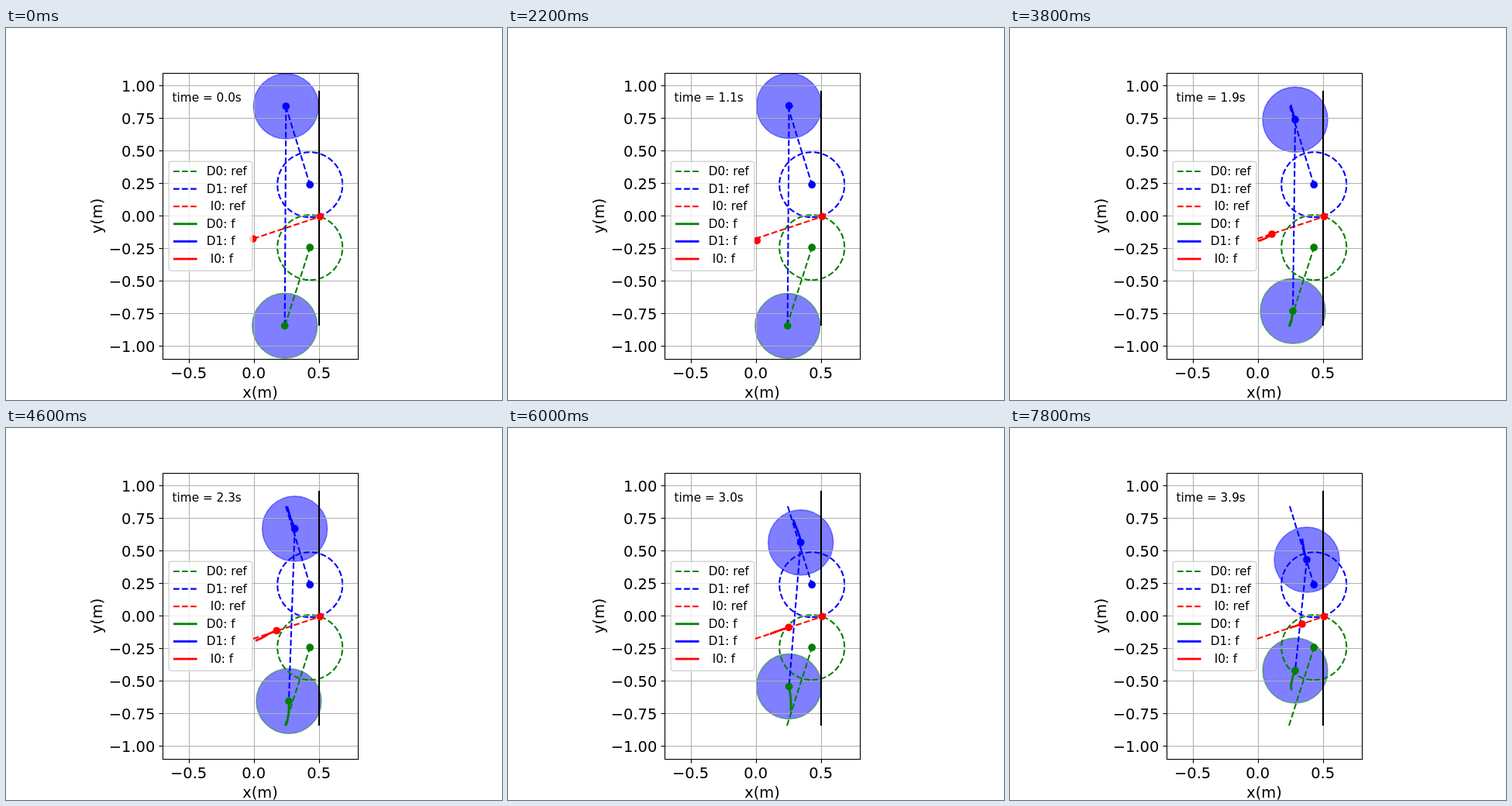
These frames come from a looping animation (640x480 px, 8 s). An HTML page with a canvas:

```html
<!DOCTYPE html>
<html lang="en">
<head>
<meta charset="utf-8">
<title>Disc trajectories</title>
<style>
html, body { margin: 0; width: 100%; height: 100%; overflow: hidden; background: #fff; }
canvas { display: block; }
</style>
</head>
<body>
<canvas id="stage" width="640" height="480"></canvas>
<script>
const ctx = document.getElementById('stage').getContext('2d');
const STEP = 200, LOOP = 8000, TRAIL = 1.1, RADIUS = 42;
const GREEN = '#008000', BLUE = '#0000ff', RED = '#ff0000';
const DASH = [7.7, 3.33];
const AXES = { left: 202.5, right: 454.5, top: 58.5, bottom: 427.5 };

// time (s), then x, y of D1, D0 and I0
const KEYS = [
  [0, 361.3, 101, 359.7, 384.3, 318.7, 272],
  [0.7, 364, 100.3, 360.3, 383.5, 320.3, 273],
  [1.2, 362.5, 101, 361, 384, 322, 274.3],
  [1.5, 364.2, 106, 363, 378.3, 328, 272],
  [1.8, 366.8, 115.2, 364.6, 368, 335.5, 267.8],
  [1.9, 368, 118.2, 365, 365.3, 338, 266],
  [2.4, 373.7, 132.8, 364.8, 349.3, 352, 260.5],
  [2.7, 376.3, 140.3, 363.8, 341, 359.3, 258.3],
  [3.0, 377.7, 147.8, 362.6, 333.5, 362.3, 257.3],
  [3.4, 379.3, 157.2, 364, 325.2, 367, 256],
  [3.6, 380.4, 162.5, 365.2, 320, 370.5, 254.8],
  [3.9, 383, 170, 368, 313, 377, 253]
];
const REFS = [
  { color: BLUE, from: [361, 101], to: [392.2, 202.2], ring: true },
  { color: GREEN, from: [360, 384], to: [392.2, 283.2], ring: true },
  { color: RED, from: [319, 272], to: [405.3, 243.3] }
];

function slope(i, c) {
  const a = KEYS[Math.max(i - 1, 0)], b = KEYS[Math.min(i + 1, KEYS.length - 1)];
  return (b[c] - a[c]) / (b[0] - a[0]);
}

// Hermite curve through the keys
function valueAt(t, c) {
  let i = 0;
  while (i < KEYS.length - 2 && t > KEYS[i + 1][0]) i++;
  const a = KEYS[i], b = KEYS[i + 1], span = b[0] - a[0], u = (t - a[0]) / span;
  const m = slope(i, c) * span, n = slope(i + 1, c) * span, d = b[c] - a[c];
  return a[c] + u * (m + u * (3 * d - 2 * m - n + u * (m + n - 2 * d)));
}

const bodyAt = (t, body) => [valueAt(t, 1 + 2 * body), valueAt(t, 2 + 2 * body)];

function line(points, color, width, dash = []) {
  ctx.beginPath();
  points.forEach(p => ctx.lineTo(...p));
  ctx.strokeStyle = color;
  ctx.lineWidth = width;
  ctx.setLineDash(dash);
  ctx.stroke();
}

function circle([x, y], r) {
  ctx.beginPath();
  ctx.arc(x, y, r, Math.PI / 2, -1.5 * Math.PI, true);
}

function dot(p, color) {
  circle(p, 4.86);
  ctx.fillStyle = color;
  ctx.fill();
}

function disc(p, edge) {
  circle(p, RADIUS);
  ctx.globalAlpha = 0.5;
  ctx.fillStyle = BLUE;
  ctx.fill();
  ctx.strokeStyle = edge;
  ctx.lineWidth = 1.39;
  ctx.setLineDash([]);
  ctx.stroke();
  ctx.globalAlpha = 1;
}

function ring(p, color) {
  circle(p, RADIUS);
  ctx.strokeStyle = color;
  ctx.lineWidth = 2.08;
  ctx.setLineDash(DASH);
  ctx.stroke();
}

function label(text, x, y, size, align = 'left') {
  ctx.font = size + 'px "DejaVu Sans", sans-serif';
  ctx.textAlign = align;
  ctx.fillStyle = '#000';
  ctx.fillText(text, x, y);
}

const tickText = (v, digits) => v.toFixed(digits).replace('-', '\u2212');

function eachTick(onX, onY) {
  for (let i = -1; i <= 1; i++) onX(320.5 + 84 * i, i / 2);
  for (let i = -4; i <= 4; i++) onY(242.5 - 42 * i, i / 4);
}

function grid() {
  const { left, right, top, bottom } = AXES;
  eachTick(
    x => line([[x, top], [x, bottom]], '#b0b0b0', 1.11),
    y => line([[left, y], [right, y]], '#b0b0b0', 1.11)
  );
}

function axes() {
  const { left, right, top, bottom } = AXES;
  eachTick(
    (x, v) => {
      line([[x, bottom], [x, bottom + 5]], '#000', 1.11);
      label(tickText(v, 1), x - 0.9, 452, 19.44, 'center');
    },
    (y, v) => {
      line([[left - 5, y], [left, y]], '#000', 1.11);
      label(tickText(v, 2), 192.3, y + 7, 19.44, 'right');
    }
  );
  ctx.strokeStyle = '#000';
  ctx.lineWidth = 1.11;
  ctx.strokeRect(left, top, right - left, bottom - top);
  label('x(m)', 328, 477, 19.44, 'center');
  ctx.save();
  ctx.translate(123.5, 242.4);
  ctx.rotate(-Math.PI / 2);
  label('y(m)', 0, 0, 19.44, 'center');
  ctx.restore();
}

function legend() {
  ctx.beginPath();
  ctx.roundRect(210.2, 172.3, 107.6, 141, 3);
  ctx.globalAlpha = 0.8;
  ctx.fillStyle = '#fff';
  ctx.fill();
  ctx.strokeStyle = '#ccc';
  ctx.lineWidth = 1.39;
  ctx.setLineDash([]);
  ctx.stroke();
  ctx.globalAlpha = 1;
  const names = ['D0', 'D1', ' I0'], colors = [GREEN, BLUE, RED];
  for (let i = 0; i < 6; i++) {
    const y = 185 + 22.6 * i, isRef = i < 3;
    line([[216, y], [246.6, y]], colors[i % 3], isRef ? 2.08 : 2.78, isRef ? DASH : []);
    label(names[i % 3] + (isRef ? ': ref' : ': f'), 258.8, y + 5, 15.28);
  }
}

function trail(t, body, color) {
  const points = [];
  for (let s = Math.max(0, t - TRAIL); s < t; s += 0.1) points.push(bodyAt(s, body));
  points.push(bodyAt(t, body));
  line(points, color, 2.78);
}

function draw(t) {
  const [d1, d0, i0] = [0, 1, 2].map(body => bodyAt(t, body));
  ctx.fillStyle = '#fff';
  ctx.fillRect(0, 0, 640, 480);

  ctx.save();
  ctx.beginPath();
  ctx.rect(AXES.left, AXES.top, AXES.right - AXES.left, AXES.bottom - AXES.top);
  ctx.clip();
  disc(d0, GREEN);
  disc(d1, BLUE);
  REFS.forEach(r => r.ring && ring(r.to, r.color));
  grid();
  line([[404, 81], [404, 384]], '#000', 2.08);
  REFS.forEach(r => {
    line([r.from, r.to], r.color, 2.08, DASH);
    dot(r.to, r.color);
  });
  REFS.forEach((r, body) => trail(t, body, r.color));
  line([d1, d0], BLUE, 2.08, DASH);
  dot(d1, BLUE);
  dot(d0, GREEN);
  dot(i0, RED);
  ctx.restore();

  axes();
  label('time = ' + t.toFixed(1) + 's', 214.6, 95, 15.28);
  legend();
}

const start = performance.now();
function tick() {
  const elapsed = Math.max(0, performance.now() - start) % LOOP;
  draw(Math.floor(elapsed / STEP) / 10);
  requestAnimationFrame(tick);
}
tick();
</script>
</body>
</html>
```
